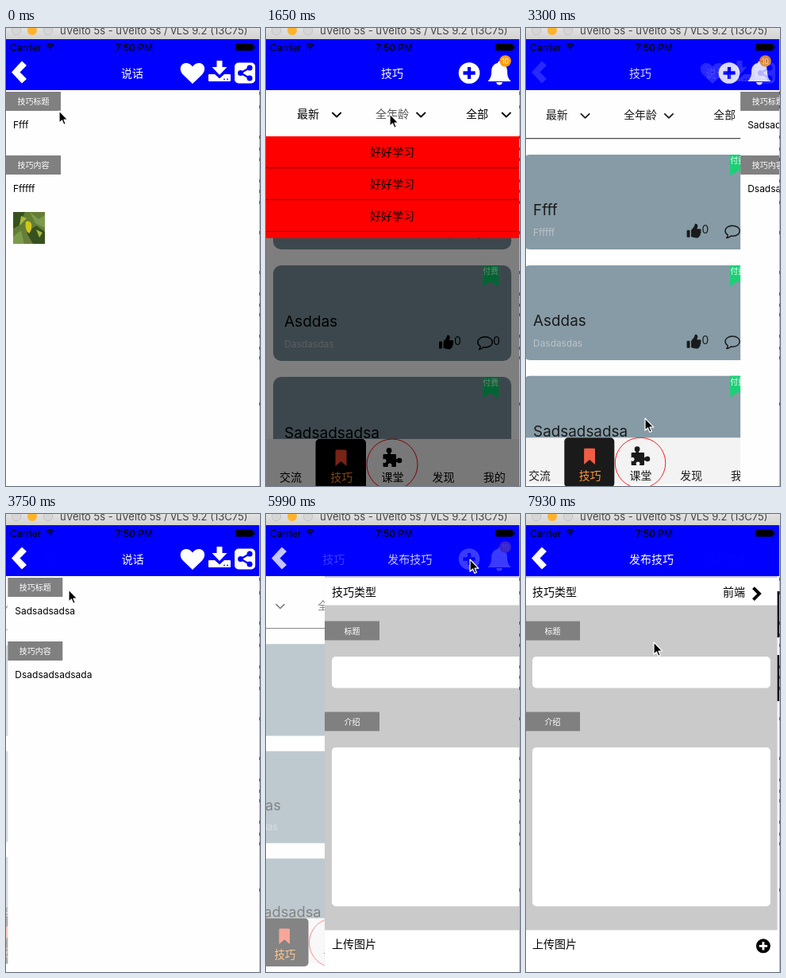
These frames come from a looping animation (320 by 575 pixels, 8000 ms). An HTML page:

```html
<!DOCTYPE html>
<html lang="zh">
<head>
<meta charset="utf-8">
<style>
html, body { margin: 0; width: 100%; height: 100%; overflow: hidden; background: #fff; }
svg { display: block; width: 100%; height: 100%; }
text { font-family: Inter, "Noto Sans CJK SC", "Noto Sans CJK", sans-serif; }
</style>
</head>
<body>
<svg id="stage" viewBox="0 0 320 575"></svg>
<script>
const BLUE = '#0000ff', LOOP = 8000;
const stage = document.getElementById('stage');
const $ = id => document.getElementById(id);

// Markup helpers
const rect = (x, y, w, h, fill, r = 0) =>
  `<rect x="${x}" y="${y}" width="${w}" height="${h}" fill="${fill}" rx="${r}"/>`;
const text = (x, y, size, str, fill = '#000', extra = '') =>
  `<text x="${x}" y="${y}" font-size="${size}" fill="${fill}" ${extra}>${str}</text>`;
const mid = (x, y, size, str, fill) => text(x, y, size, str, fill, 'text-anchor="middle"');
const path = (d, fill, extra = '') => `<path d="${d}" fill="${fill}" ${extra}/>`;
const line = (d, color, w, extra = '') => path(d, 'none', `stroke="${color}" stroke-width="${w}" ${extra}`);
const dot = (x, y, r, fill, extra = '') => `<circle cx="${x}" cy="${y}" r="${r}" fill="${fill}" ${extra}/>`;
const group = (id, body, extra = '') => `<g id="${id}" ${extra}>${body}</g>`;
const round = 'stroke-linecap="round" stroke-linejoin="round"';

const plus = (x, y, r, disc, cross) => dot(x, y, r, disc) +
  line(`M${x - r * .57} ${y}h${r * 1.14}M${x} ${y - r * .57}v${r * 1.14}`, cross, r * .32);

const tag = (y, label) => rect(0, y, 69, 24, '#808080') + mid(34.5, y + 16, 10, label, '#fff');

// Icons
const backIcon = path('M8 55.500L20 42.500 25 47 16.500 55.500 25 64 20 68.500Z', '#fff',
  'stroke="#fff" stroke-width="1.500" stroke-linejoin="round"');

const heartIcon = path('M235 70L223 58.500C217 52 220 44 227.500 44C231 44 233.500 46.500 235 48.500' +
  'C236.500 46.500 239 44 242.500 44C250 44 253 52 247 58.500Z', '#fff');

const downloadIcon = path('M265.500 41h7v8h6l-9.500 10-9.500-10h6z', '#fff') +
  path('M256 58h7l6 5.500 6-5.500h7q1 0 1 1v7q0 1-1 1h-26q-1 0-1-1v-7q0-1 1-1z', '#fff') +
  dot(275, 64.3, .9, BLUE) + dot(279, 64.3, .9, BLUE);

const shareIcon = rect(288, 43.5, 26, 26, '#fff', 5) +
  line('M307 50L295.500 56.500 307 63', BLUE, 2.4) +
  [[307, 50], [295.5, 56.5], [307, 63]].map(p => dot(...p, 3.5, BLUE)).join('');

const bellIcon = path('M294 41.500q2 0 2 2.500C302 45 304 50 304 55C304 61 306 64 308.500 67H279.500' +
  'C282 64 284 61 284 55C284 50 286 45 292 44q0-2.500 2-2.500zM290 68h8q-1 3.500-4 3.500t-4-3.500z', '#fff') +
  dot(301.5, 41.5, 7.3, '#ff9d0a') + mid(301.5, 44.6, 8.5, '10', '#fff');

const thumbIcon = rect(218, 253.5, 4, 9, '#000', 1) +
  path('M223.500 253.500L227 249.500Q228 247 228.500 245.500Q232 245 231.800 249L230.800 252H235' +
    'Q237 253 235.700 255Q236.700 257 235 258.500Q235.700 260.500 234 261Q233.500 263.300 230 263.300Q226.500 263 223.500 261.800Z', '#000');

const commentIcon = line('M276 247.800c5.500 0 9.200 3 9.200 6.600s-3.700 6.600-9.200 6.600l-2-.2' +
  'q-2.500 2.400-5.500 2.600q1.700-1.800 1.500-3.800c-2-1.300-3.200-3-3.200-5.200c0-3.600 3.700-6.600 9.200-6.600z', '#000', 1.5, 'stroke-linejoin="round"');

const puzzleIcon = rect(147.5, 535, 16.5, 16, '#000', 1) + rect(153.3, 531, 3.6, 5, '#000') +
  dot(155, 530.5, 3.4, '#000') + rect(163, 541.2, 4, 3.6, '#000') + dot(168, 543, 3.3, '#000') +
  dot(149, 543.5, 2.5, '#f2f2f2') + dot(156, 549, 2.5, '#f2f2f2') + rect(154.8, 549, 2.4, 2.5, '#f2f2f2');

// Pages
const photo = rect(9, 231, 40, 40, 'url(#leaf)') +
  path('M9 231l15 0-8 17-7 4zM34 271l-8-14 12-9 11 8v15z', '#36511f') +
  path('M30 231l11 9 8-5v16l-12-6zM9 262l10-8 4 17h-14z', '#7c9a4c') +
  path('M25 243q5-2 7 3q1 8-3 12q-6-5-4-15z', '#d2c51f') +
  path('M19 236l7 3-9 9zM38 253l8 4-4 6z', '#a8b83a');

const detail = (title, body, extra = '') => rect(0, 14, 320, 561, '#fefefe') +
  tag(80, '技巧标题') + text(9, 126, 12, title) +
  tag(160, '技巧内容') + text(9, 206, 12, body) + extra;

const card = (i, title, sub) => group('card' + i,
  rect(9, 158, 300, 120, '#78909c', 10) +
  path('M273 158h20v27l-10-7-10 7z', '#00cc66') + mid(283, 169, 10, '付费', '#fff') +
  text(23, 235, 19, title) + text(23, 261, 12, sub, '#b4bcc0') +
  thumbIcon + text(237, 258, 14, '0') + commentIcon + text(286, 258, 14, '0'),
  `transform="translate(0 ${i * 140})"`);

const filter = (x, label, arrow, id) => text(x, 113, 14, label, '#000', `id="${id}"`) +
  line(`M${arrow} 106.500l5.200 5 5.200-5`, '#000', 1.8, round);

const tabs = rect(0, 516, 320, 59, '#f2f2f2') + rect(62.5, 516, 63.5, 63, '#000', 5) +
  path('M87.500 531q0-1.500 1.500-1.500h11q1.500 0 1.500 1.500v19l-7-6-7 6z', '#f0492e') + puzzleIcon +
  ['交流', '技巧', '课堂', '发现', '我的'].map((s, i) =>
    mid(31 + i * 64.2, 569, 14, s, i === 1 ? '#ff8c1a' : '#000')).join('') +
  dot(159, 548, 32, 'none', 'stroke="#f00" stroke-width="1"');

const menuRow = i => mid(159, 161 + i * 40, 14, '好好学习') + rect(0, 175 + i * 40, 320, 1, '#600');

const list = rect(0, 14, 320, 561, '#fefefe') +
  card(0, 'Ffff', 'Ffffff') + card(1, 'Asddas', 'Dasdasdas') + card(2, 'Sadsadsadsa', 'Dsadsadsadsada') +
  filter(39, '最新', 83.8, 'newest') + filter(138, '全年龄', 190, 'ages') + filter(252, '全部', 297.5, 'all') +
  rect(0, 137, 320, 1, '#000') + tabs +
  '<rect id="dim" y="136" width="320" height="439"/>' +
  group('menu', rect(0, 136, 320, 200, '#f00') + [0, 1, 2, 3, 4].map(menuRow).join(''), 'clip-path="url(#menuClip)"');

const publish = rect(0, 14, 320, 561, '#cacaca') + rect(0, 80, 320, 34.5, '#fff') +
  text(9, 103, 14, '技巧类型') + text(249, 103, 14, '前端', '#000', 'id="choice"') +
  line('M287.500 92.500l7.500 7.500-7.500 7.500', '#000', 4) +
  tag(134.5, '标题') + rect(9, 179, 300, 39.5, '#fff', 5) +
  tag(248.5, '介绍') + rect(9, 293, 300, 199.5, '#fff', 5) +
  rect(0, 522.5, 320, 53, '#fff') + text(9, 545, 14, '上传图片') + plus(300, 542.5, 9, '#000', '#fff');

const types = rect(0, 14, 320, 561, '#fefefe') +
  rect(0, 97, 320, 58, '#000') + mid(160, 131.5, 14, '前端', '#fff') +
  rect(0, 177, 320, 58, '#000') + mid(160, 211.5, 14, '后端', '#fff');

const detailBar = backIcon + heartIcon + downloadIcon + shareIcon;
const pages = {
  first: [detail('Ffff', 'Ffffff', photo), '说话', detailBar],
  list: [list, '技巧', plus(256, 56.5, 13.3, '#fff', BLUE) + bellIcon],
  third: [detail('Sadsadsadsa', 'Dsadsadsadsada'), '说话', detailBar],
  publish: [publish, '发布技巧', backIcon],
  types: [types, '技巧类型', backIcon]
};
const names = Object.keys(pages);

const chrome = rect(0, 0, 320, 14, 'url(#chrome)') +
  dot(13, 3, 5.8, '#d6d6d6', 'stroke="#bdbdbd" stroke-width=".8"') +
  dot(33, 3, 6, '#fdb32c') + dot(53, 3, 5.8, '#d6d6d6', 'stroke="#bdbdbd" stroke-width=".8"') +
  text(68, 8, 13, 'uVelto 5s - uVelto 5s / vLS 9.2 (13C75)', '#444');

const status = text(5, 29, 12, 'Carrier') + mid(161.5, 29, 12, '7:50 PM').replace('<text', '<text font-weight="500"') +
  line('M50.500 22.500q5-4.500 10 0M52.500 24.800q3-2.600 6 0', '#000', 1.4) + path('M53.800 26.300q1.700-1.300 3.400 0l-1.700 1.900z', '#000') +
  rect(289, 20, 22.5, 8.5, '#000', 2) + rect(312.2, 22.5, 1.3, 3.5, '#000', .6);

const edge = rect(319, 14, 1, 561, '#b9b9b9') +
  [80, 97, 135, 150, 163, 190, 203, 217, 255, 305, 332, 346, 358, 385, 400, 412, 470]
    .map(y => rect(319, y, 1, 4, '#555')).join('');

stage.innerHTML = `<defs>
  <linearGradient id="chrome" x2="0" y2="1"><stop stop-color="#e2e2e2"/><stop offset="1" stop-color="#d2d2d2"/></linearGradient>
  <linearGradient id="leaf" x2="1" y2="1"><stop stop-color="#5d7c2c"/><stop offset="1" stop-color="#6f7e43"/></linearGradient>
  <clipPath id="menuClip"><rect id="menuBox" y="136" width="320" height="0"/></clipPath></defs>` +
  rect(0, 0, 320, 575, '#fff') +
  group('pages', names.map(n => group(n, pages[n][0])).join('')) +
  rect(0, 14, 320, 64, BLUE) + status +
  names.map(n => group(n + 'Title', mid(159, 62, 14, pages[n][1], '#fff')) + group(n + 'Bar', pages[n][2])).join('') +
  chrome + edge +
  group('cursor', path('M0 0V15.200L3.500 12 5.900 17.400 8.300 16.300 6 11.200H10.800Z', '#000',
    'stroke="#fff" stroke-width="1.200" stroke-linejoin="round"'));

// Timeline: start, page left, page entered, push or pop
const moves = [
  [560, 'first', 'list', 'pop'],
  [3250, 'list', 'third', 'push'],
  [4380, 'third', 'list', 'pop'],
  [5790, 'list', 'publish', 'push'],
  [6640, 'publish', 'types', 'push'],
  [7460, 'types', 'publish', 'pop']
];

// Pointer: time, x, y
const track = [
  [0, 67, 104], [350, 16, 57], [700, 16, 57], [1050, 100, 95], [1350, 156, 108], [1750, 156, 108],
  [2100, 165, 195], [2250, 165, 200], [2700, 192, 415], [3000, 150, 490], [3300, 150, 490],
  [3750, 79, 95], [4080, 16, 57], [4450, 16, 57], [4800, 260, 114], [5090, 257, 57], [6050, 257, 57],
  [6400, 262, 97], [6700, 262, 97], [7030, 139, 120], [7350, 150, 128], [7550, 150, 128], [7930, 161, 161]
];

const clamp = v => Math.max(0, Math.min(1, v));
const smooth = v => (v = clamp(v)) * v * (3 - 2 * v);
const spring = ms => { const w = ms * .014; return 1 - (1 + w) * Math.exp(-w); };

// The screen refreshes every 150 ms, with two short beats
const tick = t => {
  const base = t >= 6880 ? 6880 : t >= 4940 ? 4940 : 0;
  return base + Math.floor((t - base) / 150) * 150;
};

function place(name, x, depth, opacity, titleX) {
  const s = 1 - .05 * depth, page = $(name);
  page.style.display = '';
  page.setAttribute('transform', `translate(${x + 160 * (1 - s)} ${293 * (1 - s)}) scale(${s})`);
  page.setAttribute('opacity', 1 - .68 * depth);
  $(name + 'Title').setAttribute('transform', `translate(${titleX} 0)`);
  for (const part of ['Title', 'Bar']) {
    $(name + part).style.display = '';
    $(name + part).setAttribute('opacity', opacity);
  }
}

const behind = (name, p) => place(name, -96 * p, p, 1 - p, -96 * p);
const above = (name, p) => place(name, 320 * (1 - p), 0, p, 96 * (1 - p));

function showPages(t) {
  for (const n of names) for (const part of ['', 'Title', 'Bar']) $(n + part).style.display = 'none';
  const move = moves.filter(m => m[0] <= t).pop();
  if (!move) return above('first', 1);
  const [start, from, to, kind] = move;
  let e = spring(t - start);
  if (e > .998) e = 1;
  const [low, high, p] = kind === 'push' ? [from, to, e] : [to, from, 1 - e];
  $('pages').append($(low), $(high));
  if (p < 1) behind(low, p);
  if (p > 0) above(high, p);
}

function showMenu(t) {
  const open = smooth((t - 1472) / 300) * (1 - smooth((t - 2170) / 300));
  $('menuBox').setAttribute('height', 200 * open);
  $('dim').setAttribute('opacity', .5 * clamp(open * 2));
  $('ages').setAttribute('fill', t >= 1500 && t < 1800 ? '#555' : '#000');
}

function showCursor(t) {
  let i = track.findIndex(k => k[0] > t);
  if (i < 0) i = track.length - 1;
  const a = track[i - 1], b = track[i], p = clamp((t - a[0]) / (b[0] - a[0]));
  $('cursor').setAttribute('transform',
    `translate(${a[1] + (b[1] - a[1]) * p} ${a[2] + (b[2] - a[2]) * p})`);
}

function draw(t) {
  showPages(t);
  showMenu(t);
  showCursor(t);
  $('choice').setAttribute('opacity', t >= 7460 ? 1 : 0);
}

let origin;
function frame(now) {
  origin ??= now;
  draw(tick((now - origin) % LOOP));
  requestAnimationFrame(frame);
}
draw(0);
requestAnimationFrame(frame);
</script>
</body>
</html>
```
